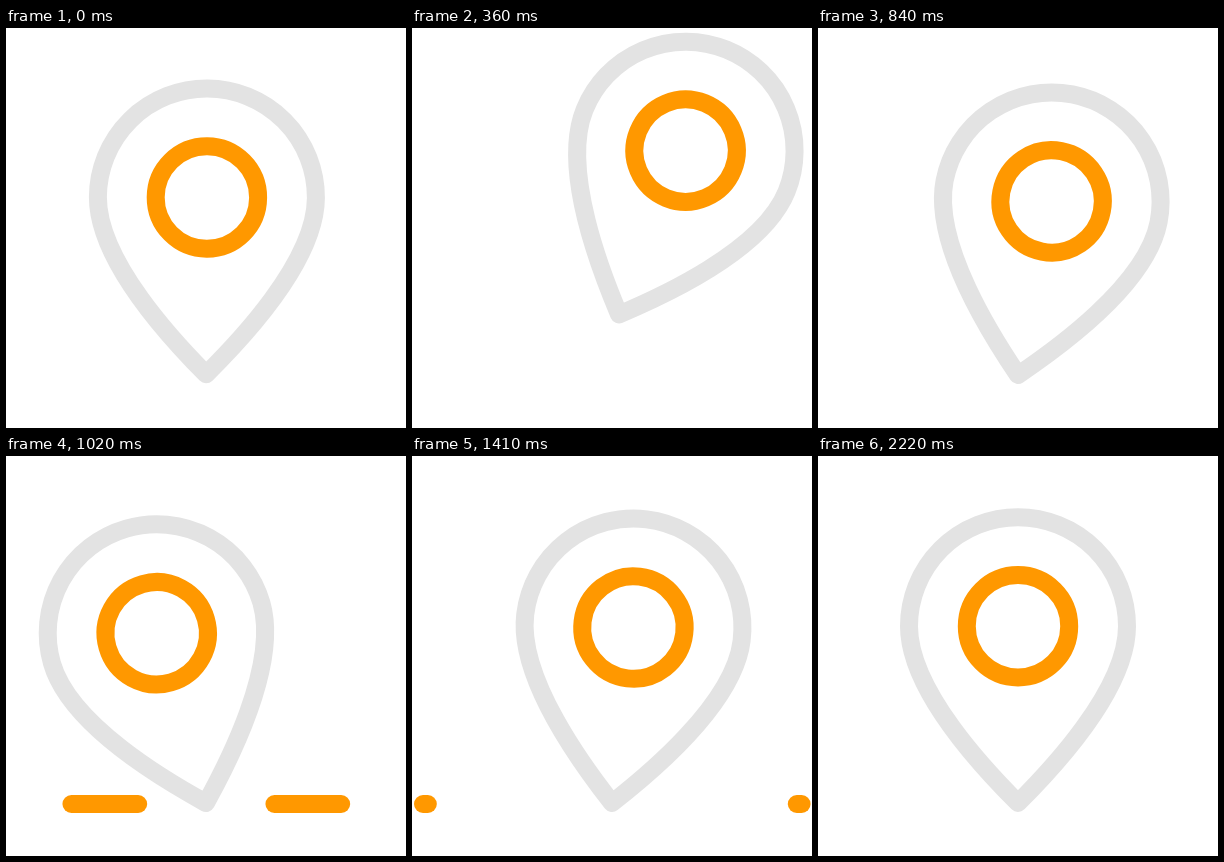
These frames come from a looping animation (400 px wide and 400 px high, 2.25 s). An HTML page:

```html
<!DOCTYPE html>
<html lang="en">
<head>
<meta charset="utf-8">
<title>Hopping map pin</title>
<style>
  html, body { margin: 0; width: 100%; height: 100%; overflow: hidden; background: #fff; }
  svg { display: block; width: 100%; height: 100%; }
  path, circle { fill: none; stroke-width: 18; stroke-linecap: round; stroke-linejoin: round; }
  .outline { stroke: #e3e3e3; }
  .accent { stroke: #ff9800; }
</style>
</head>
<body>
<svg viewBox="0 0 400 400">
  <path class="accent dash"/>
  <path class="accent dash" transform="translate(400.6) scale(-1 1)"/>
  <!-- the pin's tip is the local origin -->
  <g id="pin">
    <path class="outline" d="M0 0C-30 -30 -109 -112 -109 -176.8A109 109 0 0 1 109 -176.8C109 -112 30 -30 0 0Z"/>
    <circle class="accent" cy="-176.8" r="51.2"/>
  </g>
</svg>
<script>
  const STEP = 30, STEPS = 75;
  const pin = document.getElementById('pin');
  const dashes = document.querySelectorAll('.dash');

  // smooth 0 to 1 between steps a and b
  function ramp(s, a, b) {
    const u = Math.min(1, Math.max(0, (s - a) / (b - a)));
    return u * u * (3 - 2 * u);
  }

  const hop = s => ramp(s, 0, 16.5) - ramp(s, 22, 28);

  // lean right in the air, then rock to rest
  const lean = s => 25 * ramp(s, 0, 16.5) - 42.8 * ramp(s, 24.4, 36.4)
    + 27.8 * ramp(s, 36.4, 51) - 14 * ramp(s, 51, 63.4) + 4 * ramp(s, 63.4, 75);

  const dashEnd = (s, a, b) => 137 - 126 * ramp(s, a, b);

  function draw(now) {
    const s = Math.floor(now / STEP) % STEPS + 1;
    const h = hop(s);
    pin.setAttribute('transform',
      `translate(${200 + 8 * h} ${347 - 68.5 * h}) rotate(${lean(s)})`);

    const outer = dashEnd(s, 29, 40), inner = dashEnd(s, 33, 50);
    const d = inner > outer ? `M${inner} 348H${outer}` : '';
    for (const dash of dashes) dash.setAttribute('d', d);
  }

  let start;
  function tick(now) {
    start ??= now;
    draw(now - start);
    requestAnimationFrame(tick);
  }
  draw(0);
  requestAnimationFrame(tick);
</script>
</body>
</html>
```
